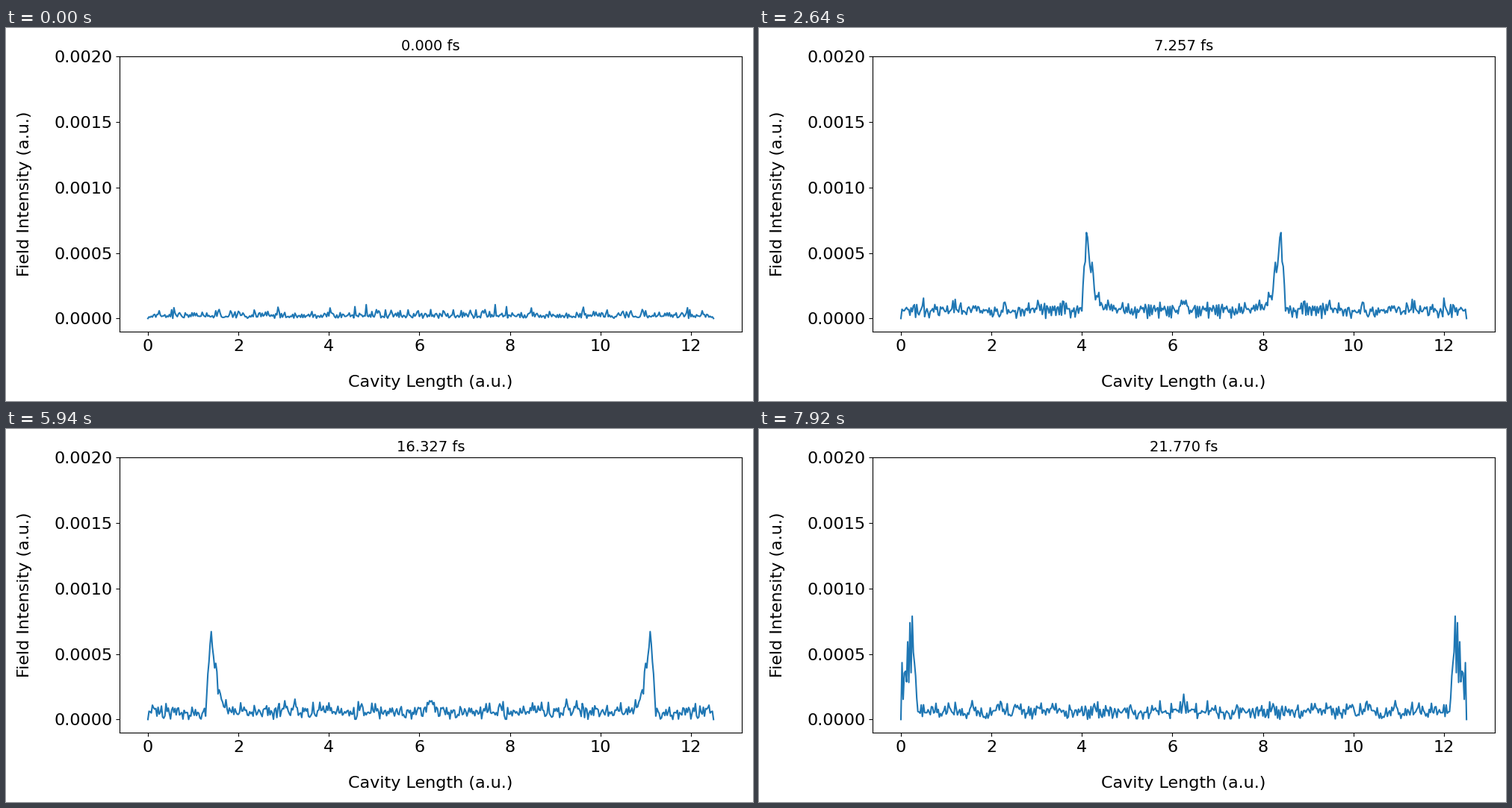
Recreate the animation shown at these times as a matplotlib script. Size 1000 by 500 pixels, loop 8 s.

```python
import numpy as np
import matplotlib.pyplot as plt
from matplotlib.animation import FuncAnimation

LENGTH = 12.5        # cavity length
MID = LENGTH / 2
C = 0.29979          # light speed per fs
DT = 0.60472         # simulated fs per step
TICK_MS, STEP_MS, LOOP_MS = 20, 220, 8000
STEPS = -(-LOOP_MS // STEP_MS)

x = np.linspace(0, LENGTH, 501)
half = x[:251]
dx = x[1]

# Pulse intensity against distance behind the light front
PULSE_S = [-.075, -.04, -.01, .03, .055, .08, .12, .155, .20, .25, .32, .45, .65]
PULSE_I = [0, 25, 36, 60, 56, 42, 30, 35, 17, 10, 6, 3, 0]


def pulse(s):
    return np.interp(s, PULSE_S, PULSE_I, left=0, right=0) * 1e-5


def noise(step):
    rng = np.random.default_rng(40 + step)
    if step == 0:
        return rng.gamma(2, 1.4e-5, half.size)
    return np.abs(rng.normal(6.2e-5, 3.3e-5, half.size))


def intensity(step):
    """Noise floor, centre bump and pulse with its wall reflection."""
    t = step * DT
    rise = 1 - np.exp(-t / 0.4)
    front = MID - C * t
    out = pulse(half - front)
    back = pulse(0.01 - half - front)
    fringe = 2 * np.sqrt(out * back) * np.cos(0.875 * np.pi * half / dx)
    bump = 9e-5 * np.exp(-((half - MID) / 0.06) ** 2)
    left = noise(step) + rise * (out + back - fringe + bump)
    left[0] = 0
    return np.concatenate([left, left[-2::-1]])


curves = [intensity(k) for k in range(STEPS)]

plt.rcParams["font.family"] = "DejaVu Sans"
fig, ax = plt.subplots(figsize=(10, 5), dpi=100)
line, = ax.plot(x, curves[0], color="tab:blue", lw=1.5)
ax.set_xlim(-0.05 * LENGTH, 1.05 * LENGTH)
ax.set_ylim(-0.0001, 0.002)
ax.set_xticks(range(0, 13, 2))
ax.set_yticks(np.arange(5) * 0.0005)
ax.tick_params(labelsize=16)
ax.set_xlabel("Cavity Length (a.u.)", fontsize=16, labelpad=20.7)
ax.set_ylabel("Field Intensity (a.u.)", fontsize=16, labelpad=20.7)
title = ax.set_title("0.000 fs", fontsize=14)
fig.tight_layout()
fig.subplots_adjust(left=0.1521, bottom=0.1862)


def update(i):
    k = i * TICK_MS // STEP_MS
    line.set_ydata(curves[k])
    title.set_text(f"{k * DT:.3f} fs")
    return line, title


anim = FuncAnimation(fig, update, frames=LOOP_MS // TICK_MS, interval=TICK_MS,
                     repeat=True, repeat_delay=0, blit=False)
plt.show()
```
